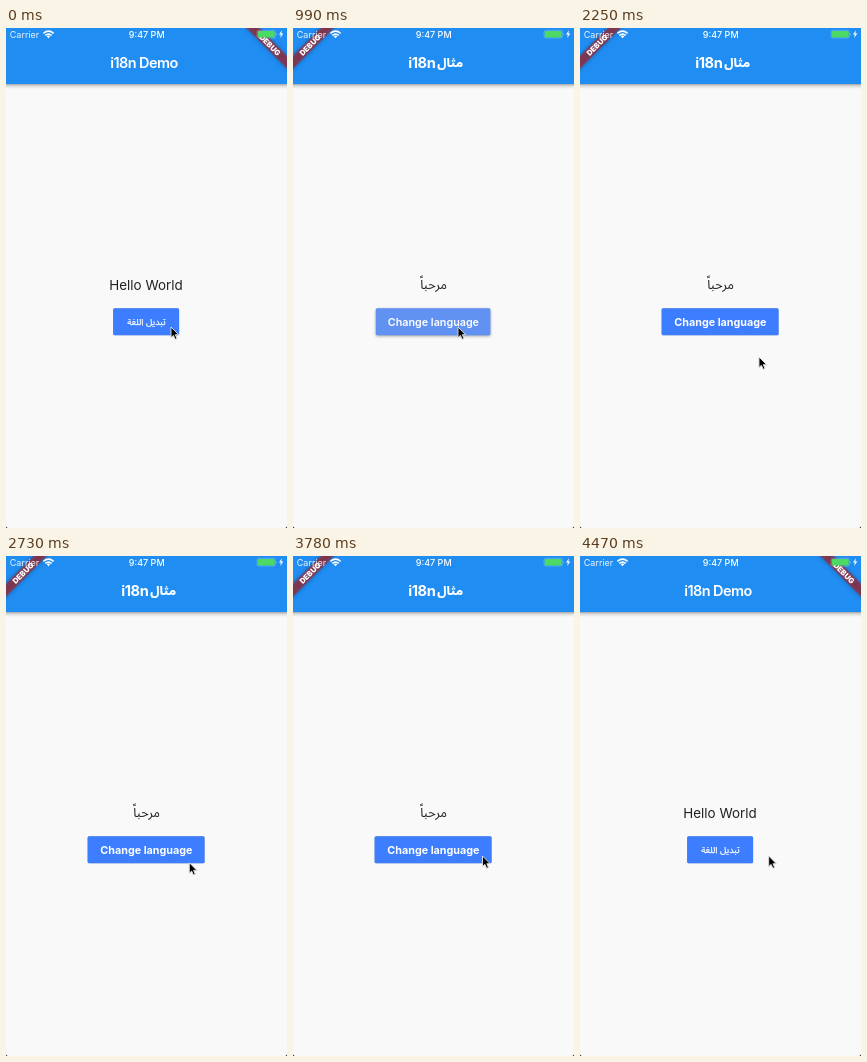
An HTML page that plays this animation: 281 by 500 pixels, repeating every 4500 ms.

```html
<!DOCTYPE html>
<html lang="en">
<head>
<meta charset="utf-8">
<title>i18n Demo</title>
<style>
  html, body { margin: 0; width: 100%; height: 100%; overflow: hidden; background: #f9f9f9; }
  svg { display: block; width: 281px; height: 500px; }
  text { font-family: Inter, "Noto Sans Arabic", "DejaVu Sans", sans-serif; text-anchor: middle; fill: #fff; }
  .title { font-size: 14.5px; font-weight: 600; letter-spacing: -.6px; }
  .bold { font-weight: 700; font-size: 14.6px; letter-spacing: -.4px; }
  .body { font-size: 13.4px; fill: #202020; }
  .status { font-size: 9px; }
  .debug { font-size: 7.6px; font-weight: 900; }
</style>
</head>
<body>
<svg viewBox="0 0 281 500">
  <defs>
    <linearGradient id="fade" x2="0" y2="1">
      <stop stop-color="#000" stop-opacity=".34"/>
      <stop offset=".4" stop-color="#000" stop-opacity=".12"/>
      <stop offset="1" stop-color="#000" stop-opacity="0"/>
    </linearGradient>
    <clipPath id="clip"><rect class="box" y="280.3" height="27" rx="1.5"/></clipPath>
  </defs>

  <rect width="281" height="500" fill="#f9f9f9"/>
  <rect y="56" width="281" height="5" fill="url(#fade)"/>
  <rect width="281" height="56" fill="#208df2"/>
  <path d="M0 498.5V500H1.5ZM281 498.5V500H279.5Z" fill="#222"/>

  <rect id="button" class="box" y="280.3" height="27" rx="1.5" fill="#3c7eff"/>
  <g clip-path="url(#clip)"><circle id="ripple" fill="#c8c8c8"/></g>

  <g id="english">
    <text class="title" x="138" y="40">i18n Demo</text>
    <text class="body" x="140" y="262">Hello World</text>
    <text id="toArabic" x="140.5" y="296.5" font-size="9" stroke="#fff">تبديل اللغة</text>
  </g>
  <g id="arabic">
    <text class="bold" x="128.8" y="40">i18n</text>
    <text x="157.2" y="39" font-size="12.6" font-weight="700" stroke="#fff" stroke-width=".2">مثال</text>
    <text class="body" x="140.6" y="261.3" style="font-size:12.8px">مرحباً</text>
    <text id="toEnglish" x="140.4" y="298" font-size="10.75">Change language</text>
  </g>

  <g id="banner">
    <rect x="-32" y="19.7" width="64" height="9" fill="#b71c1c" fill-opacity=".63"
      style="filter:drop-shadow(0 0 2px rgba(0,0,0,.5))"/>
    <text class="debug" y="26.9">DEBUG</text>
  </g>

  <g fill="none" stroke="#fff" stroke-width="1.6">
    <path d="M37.4 5.4Q42.5 .9 47.6 5.4M39.3 7.4Q42.5 4.7 45.7 7.4"/>
    <path d="M40.7 8.2Q42.5 6.9 44.3 8.2L42.5 10.2Z" fill="#fff" stroke="none"/>
    <rect x="251" y="2.3" width="18.4" height="7.8" rx="1.8" stroke-width=".7" stroke-opacity=".35"/>
    <rect x="251.7" y="3" width="17" height="6.4" rx="1.2" fill="#4cd964" stroke="none"/>
    <path d="M270.2 4.9Q271.6 6.2 270.2 7.5Z" fill="#fff" fill-opacity=".5" stroke="none"/>
    <path d="M276 2.2L273 6.6H274.9L274.2 10L277.3 5.5H275.3Z" fill="#fff" stroke="none"/>
  </g>
  <text class="status" x="18.5" y="9.6" fill-opacity=".9">Carrier</text>
  <text class="status" x="140.7" y="9.6" font-weight="500">9:47 PM</text>

  <path id="cursor" d="M0 0V10.6L2.4 8.4L4.2 12.3L6 11.5L4.3 7.7H7.6Z" fill="#000" stroke="#fff" stroke-width=".8"
    style="filter:drop-shadow(0 .6px .6px rgba(0,0,0,.35))"/>
</svg>
<script>
const LOOP = 4500;
const TAPS = [
  { down: 800, up: 880, x: 165, y: 299 },
  { down: 3840, up: 3905, x: 189.5, y: 300 },
];
// [time, x, y] of the pointer tip
const PATH = [
  [0, 165, 299], [1180, 165, 299], [1530, 179, 329], [2240, 179, 329],
  [2690, 183.3, 306.7], [2760, 183.3, 306.7], [3200, 189.5, 300], [4350, 189.5, 300], [4440, 188.7, 300],
];
const WIDTH = { english: 66, arabic: 117 };
const MIDDLE = 140.1;

const $ = id => document.getElementById(id);
const set = (el, attrs) => { for (const k in attrs) el.setAttribute(k, attrs[k]); };
const ramp = (t, from, to) => Math.min(1, Math.max(0, (t - from) / (to - from)));
const ease = p => p * p * (3 - 2 * p);
const mix = (a, b, p) => a + (b - a) * p;

function pointer(t) {
  const i = PATH.findIndex(p => p[0] > t);
  if (i < 0) return PATH[PATH.length - 1].slice(1);
  const a = PATH[i - 1], b = PATH[i], p = ease(ramp(t, a[0], b[0]));
  return [mix(a[1], b[1], p), mix(a[2], b[2], p)];
}

function draw(t) {
  const [first, second] = TAPS;
  const arabic = t >= first.up && t < second.up;
  const toBold = ease(ramp(t, first.up, first.up + 200));
  const toLight = t < second.up ? 1 : ease(ramp(t, second.up, second.up + 200));

  const width = arabic ? mix(111, WIDTH.arabic, toBold) : WIDTH.english;
  const left = MIDDLE - width / 2;
  document.querySelectorAll('.box').forEach(el => set(el, { x: left, width }));

  $('english').style.display = arabic ? 'none' : '';
  $('arabic').style.display = arabic ? '' : 'none';
  $('toEnglish').style.fontWeight = Math.round(mix(400, 700, toBold));
  $('toArabic').style.strokeWidth = mix(.6, .25, t < first.up ? 1 : toLight);
  set($('banner'), { transform: arabic ? 'rotate(-45)' : 'translate(281) rotate(45)' });

  // The splash keeps its offset from the button's left edge when the button resizes.
  const tap = t < 2000 ? first : second;
  const oldLeft = MIDDLE - (tap === first ? WIDTH.english : WIDTH.arabic) / 2;
  const shift = t >= tap.up ? left - oldLeft : 0;
  const fade = 1 - ramp(t, tap.up + 60, tap.up + 330);
  set($('ripple'), {
    cx: tap.x + shift,
    cy: tap.y,
    r: t < tap.down ? 0 : 20 + (t - tap.down) * .42,
    opacity: .32 * ramp(t, tap.down, tap.down + 60) * fade,
  });

  const lift = ease(ramp(t, tap.down, tap.down + 80)) * (1 - ease(ramp(t, tap.up + 60, tap.up + 260)));
  $('button').style.filter =
    `drop-shadow(0 ${mix(.9, 1.9, lift)}px ${mix(.7, 1.7, lift)}px rgba(0,0,0,.34))`;

  set($('cursor'), { transform: `translate(${pointer(t)})` });
}

function tick() {
  draw(performance.now() % LOOP);
  requestAnimationFrame(tick);
}
tick();
</script>
</body>
</html>
```
